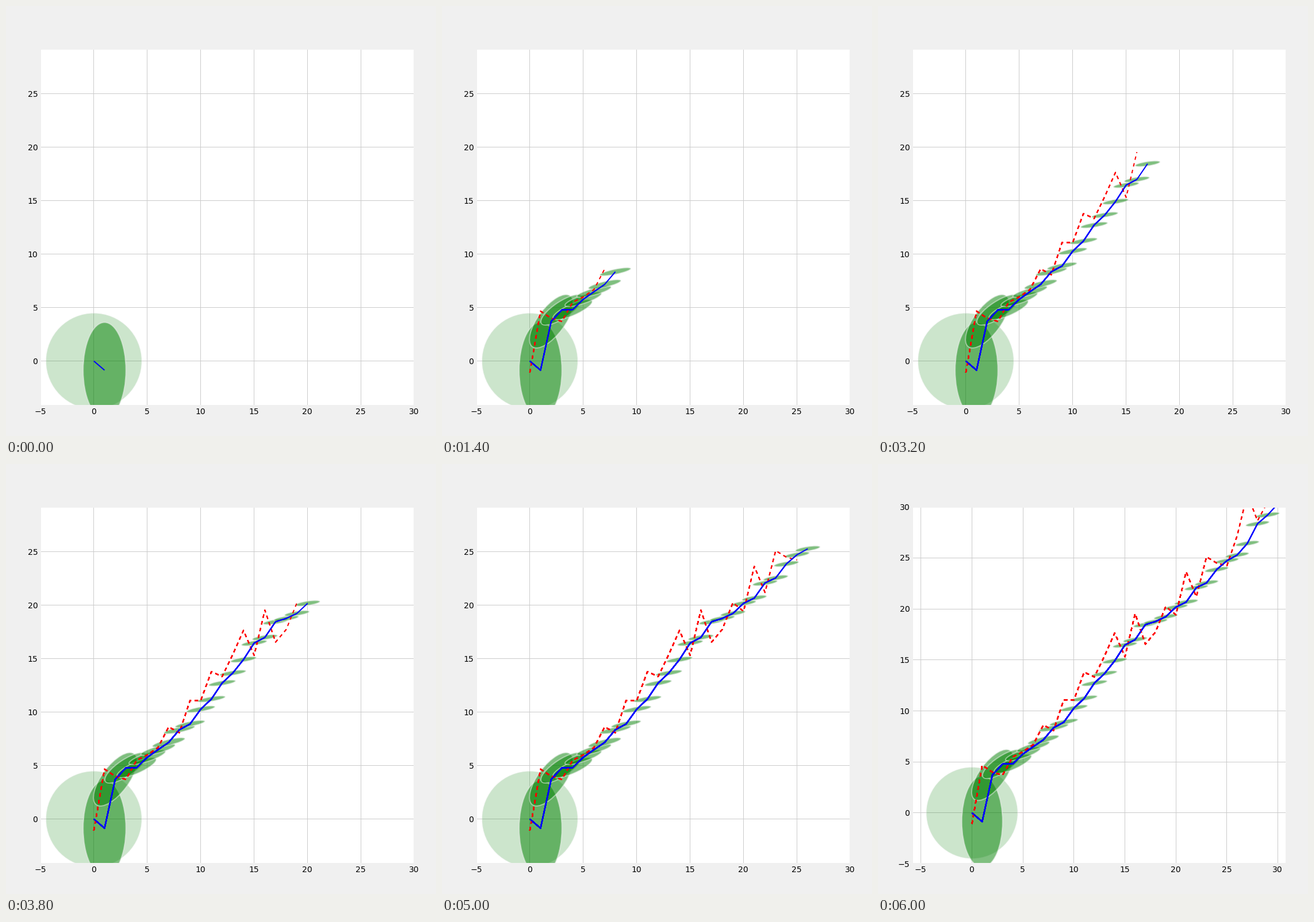
A matplotlib script for the animation above (7.4 s loop, 748 by 748 pixels).

```python
import numpy as np
import matplotlib.pyplot as plt
from matplotlib.animation import FuncAnimation
from matplotlib.patches import Ellipse
from matplotlib.transforms import Affine2D

DPI = 68
SIZE = 748
PX = 72 / DPI          # points per pixel
STEPS, HOLD = 31, 6    # growing frames, then extra frames at rest
WIDEN_AT = 26          # frame where the view zooms out
WIDTH, HEIGHT = 0.87, 0.83

BACK = "#f0f0f0"
GRID = "#cbcbcb"

# noisy measurements of a steadily moving position
zs = [-1.07, 4.67, 4.00, 3.71, 5.50, 6.00, 6.69, 8.62, 8.08, 11.09, 11.09,
      13.80, 13.33, 15.40, 17.65, 15.31, 19.55, 16.55, 17.74, 20.24, 19.43,
      23.65, 21.20, 25.11, 24.50, 24.24, 27.17, 31.25, 28.65, 30.50, 32.00]


def kalman(zs, r=5.0, q=0.01, p0=20.0):
    """Return filtered positions and covariances, starting with the prior."""
    F = np.array([[1.0, 1.0], [0.0, 1.0]])
    x, P = np.zeros(2), np.eye(2) * p0
    means, covs = [x[0]], [P]
    for z in zs:
        K = P[:, 0] / (P[0, 0] + r)
        x = x + K * (z - x[0])
        P = P - np.outer(K, P[0])
        means.append(x[0])
        covs.append(P)
        x, P = F @ x, F @ P @ F.T + np.eye(2) * q
    return means, covs


plt.rcParams["font.family"] = "DejaVu Sans"
fig = plt.figure(figsize=(SIZE / DPI, SIZE / DPI), dpi=DPI, facecolor=BACK)

# the frame sits half a pixel up and left so that its lines snap downwards;
# the data is moved back to its true place
half = 0.5 / SIZE
ax = fig.add_axes([0.08 - half, 0.07 + half, WIDTH, HEIGHT],
                  facecolor="white")
place = ax.transData + Affine2D().translate(0.5, -0.5)

ax.set_axisbelow(True)
ax.grid(color=GRID, lw=PX, ls="-")
ax.tick_params(length=0, labelsize=14 * PX, pad=4 * PX)
ax.set_xticks(range(-5, 31, 5))
ax.set_yticks(range(-5, 31, 5))
for spine in ax.spines.values():
    spine.set(color=BACK, lw=3 * PX)


def cov_ellipse(center, cov, alpha):
    vals, vecs = np.linalg.eigh(cov)
    w, h = 2 * np.sqrt(vals[::-1])
    angle = np.degrees(np.arctan2(vecs[1, 1], vecs[0, 1]))
    e = Ellipse(center, w, h, angle=angle, fc="green", ec=BACK,
                lw=2 * PX, alpha=alpha, transform=place)
    return ax.add_patch(e)


def track(ys, **style):
    line, = ax.plot(range(len(ys)), ys, lw=2 * PX, transform=place, **style)
    return line


means, covs = kalman(zs)
ellipses = [cov_ellipse((i, m), c, 0.5 if i else 0.2)
            for i, (m, c) in enumerate(zip(means, covs))]

# every step draws the whole track again, so older parts look heavier
tracks = [(track(zs[:n], color="red", ls=(0, (3, 3)), dash_capstyle="butt"),
           track(means[:n + 1], color="blue", solid_capstyle="butt"))
          for n in range(1, STEPS + 1)]


def set_view(wide):
    """Equal scales on both axes: fit the width first, later the height."""
    mid, span, ratio = 12.5, 35, WIDTH / HEIGHT
    xs, ys = (span * ratio, span) if wide else (span, span / ratio)
    ax.set_xlim(mid - xs / 2, mid + xs / 2)
    ax.set_ylim(mid - ys / 2, mid + ys / 2)


def update(frame):
    step = min(frame, STEPS - 1)
    set_view(step >= WIDEN_AT)
    for i, e in enumerate(ellipses):
        e.set_visible(i <= step + 1)
    for i, pair in enumerate(tracks):
        for line in pair:
            line.set_visible(i <= step)
    return []


anim = FuncAnimation(fig, update, frames=STEPS + HOLD, interval=200,
                     init_func=lambda: update(0), repeat=True)
plt.show()
```
